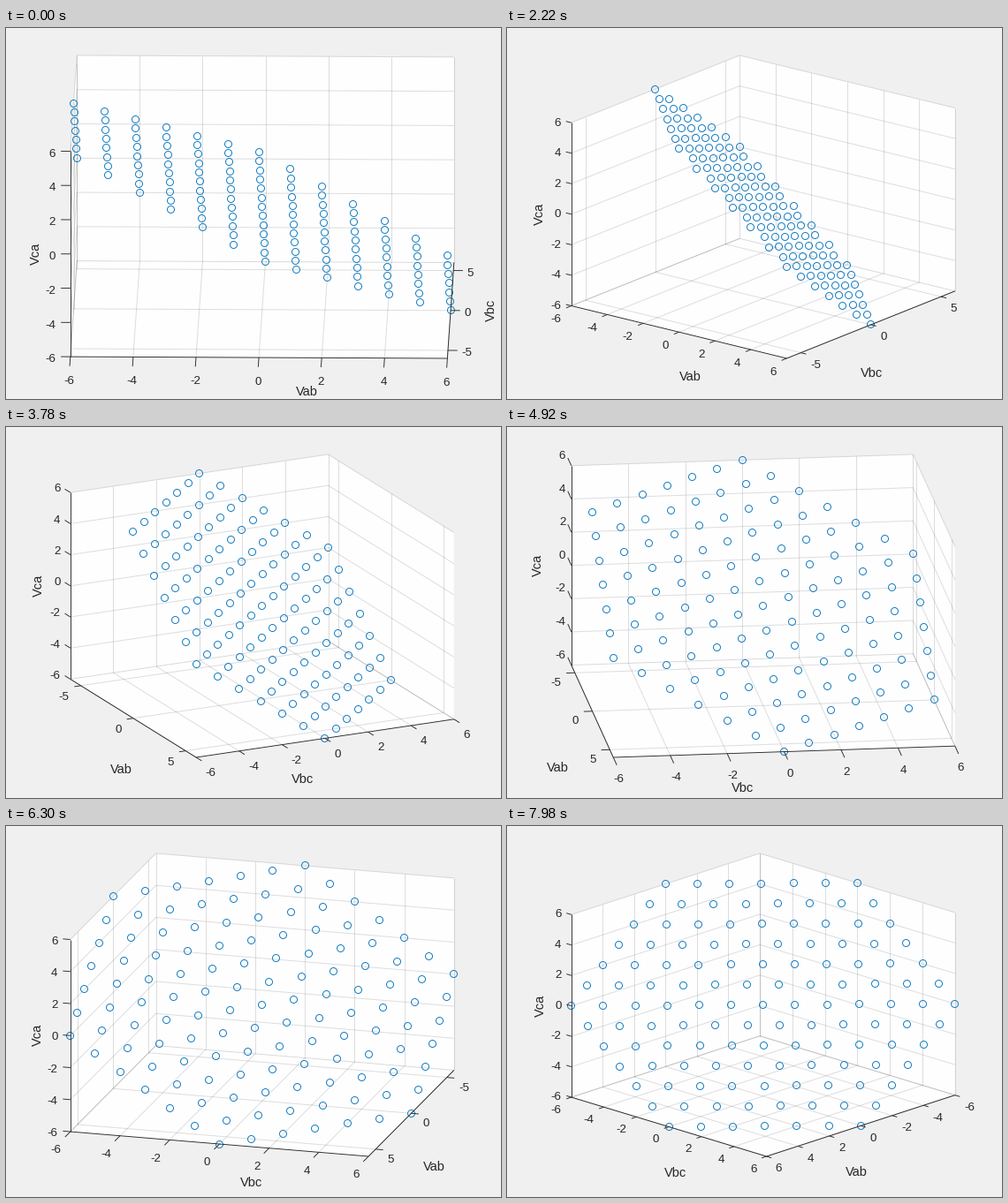
These frames come from a looping animation (560 by 420 pixels, 8000 ms). A matplotlib script:

```python
import numpy as np
import matplotlib.pyplot as plt
from matplotlib.animation import FuncAnimation
from matplotlib.collections import (EllipseCollection, LineCollection,
                                    PolyCollection)

W, H, DPI = 560, 420, 100
PX = 72 / DPI                      # points per pixel
LEFT, TOP, BOX_W, BOX_H = 72.8, 31, 434, 343
LIM = 6
ELEV = np.tan(np.radians(25))
INK = (0.15, 0.15, 0.15)
BLUE = "#0072BD"
TICK_PX, NAME_PX = 13.33, 14.67
NAMES = ("Vab", "Vbc", "Vca")
# sideways shift of an axis name against the lean of its axis in degrees
LEAN = (0, 26, 52, 70, 83, 90)
SHIFT = (55, 25, -1, -20, -39.5, -46)

plt.rcParams["font.family"] = "Liberation Sans"
fig = plt.figure(figsize=(W / DPI, H / DPI), dpi=DPI, facecolor="#f0f0f0")
ax = fig.add_axes([0, 0, 1, 1])
ax.set_xlim(0, W)
ax.set_ylim(H, 0)
ax.axis("off")

# all integer triples inside the cube whose sum is zero
span = range(-LIM, LIM + 1)
POINTS = np.array([(a, b, -a - b) for a in span for b in span
                   if abs(a + b) <= LIM], float)

walls = PolyCollection([], facecolors="#fefefe", edgecolors="none", zorder=1)
grid = LineCollection([], colors=[INK + (0.15,)], linewidths=PX, zorder=2)
dots = EllipseCollection([8], [8], [0], units="xy", offsets=POINTS[:, :2],
                         offset_transform=ax.transData, facecolors="none",
                         edgecolors=BLUE, linewidths=0.9 * PX, zorder=3)
rulers = LineCollection([], colors=[INK], linewidths=0.9 * PX, zorder=4)
for part in (walls, grid, dots, rulers):
    ax.add_collection(part, autolim=False)


def make_text(size):
    return ax.text(0, 0, "", fontsize=size * PX, color=INK, va="baseline",
                   ha="center", rotation_mode="anchor", zorder=5)


tick_texts = [make_text(TICK_PX) for _ in range(21)]
name_texts = [make_text(NAME_PX) for _ in NAMES]


def projector(az):
    """Orthographic view stretched so that the cube fills the plot box."""
    c, s = np.cos(np.radians(az)), np.sin(np.radians(az))
    spread = abs(c) + abs(s)
    kx = BOX_W / (2 * LIM * spread)
    ky = BOX_H / (2 * LIM * (1 + ELEV * spread))

    def project(p):
        x, y, z = np.moveaxis(np.asarray(p, float), -1, 0)
        u = LEFT + BOX_W / 2 + kx * (c * x + s * y)
        v = TOP + BOX_H / 2 - ky * (ELEV * (c * y - s * x) + z)
        return np.stack([u, v], -1)

    return project


def edge(axis, base):
    """The two ends of the cube edge along an axis through a corner."""
    a, b = list(base), list(base)
    a[axis], b[axis] = -LIM, LIM
    return np.array([a, b], float)


def wall(axis, value):
    i, j = [k for k in range(3) if k != axis]
    quad = np.full((4, 3), float(value))
    quad[:, i] = [-LIM, LIM, LIM, -LIM]
    quad[:, j] = [-LIM, -LIM, LIM, LIM]
    return quad


def place_tick(text, value, at, way, length, is_z):
    x, y = at + way * (length + 6)
    if abs(way[0]) < (0.3 if is_z else 0.5):
        align = "center"
    else:
        align = "left" if way[0] > 0 else "right"
    if align == "left":
        x -= 1
    below = not is_z and abs(way[1]) > 0.02
    y += 8.3 if below else 0.6
    text.set(text=str(value), ha=align, position=(x, y + 0.43 * TICK_PX))


def place_name(text, mid, lean, on_left):
    shift = np.interp(lean, LEAN, SHIFT)
    x = mid[0] + (shift if on_left else -shift)
    if lean > 87:
        text.set(rotation=90, position=(x + 0.36 * NAME_PX, mid[1]))
    else:
        y = mid[1] + 37 + 0.3 * lean
        text.set(rotation=0, position=(x, y + 0.41 * NAME_PX))


def draw(i):
    az = 1 + i // 3                # one degree every 60 ms
    project = projector(az)
    x_left = az <= 90              # which floor axis runs on the left
    front_y = -LIM if x_left else LIM
    z_base = (-LIM if x_left else LIM, -LIM, -LIM)

    edges = [edge(0, (0, front_y, -LIM)), edge(1, (LIM, 0, -LIM)),
             edge(2, z_base)]
    lines = [project(e) for e in edges]
    sizes = [np.hypot(*(l[1] - l[0])) for l in lines]
    length = 0.025 * max(sizes)
    steps = [2 if sizes[0] > 213 else 5, 2 if sizes[1] > 213 else 5, 2]
    ticks = [range(-(LIM // s) * s, LIM + 1, s) for s in steps]

    back = (-LIM, -front_y, -LIM)
    walls.set_verts([project(wall(k, back[k])) for k in range(3)])
    mesh = []
    for plane in range(3):
        for fixed in range(3):
            if fixed == plane:
                continue
            run = 3 - plane - fixed
            for t in ticks[fixed]:
                base = [0, 0, 0]
                base[plane], base[fixed] = back[plane], t
                mesh.append(project(edge(run, base)))
    grid.set_segments(mesh)
    dots.set_offsets(np.floor(project(POINTS)) + 0.5)   # whole pixels

    # outward directions of the tick marks
    out = np.zeros((3, 3))
    out[0, 1] = np.sign(front_y)
    out[1, 0] = 1
    out[2, 0 if x_left else 1] = -1

    strokes = list(lines)
    spare = iter(tick_texts)
    origin = project((0, 0, 0))
    for k in range(3):
        way = project(out[k]) - origin
        way = way / np.hypot(*way)
        for t in ticks[k]:
            p = edges[k][0].copy()
            p[k] = t
            at = project(p)
            strokes.append(np.array([at, at + way * length]))
            place_tick(next(spare), t, at, way, length, k == 2)
    rulers.set_segments(strokes)
    for text in spare:
        text.set_text("")

    mids = [l.mean(axis=0) for l in lines]
    place_name(name_texts[0], mids[0], min(az, 180 - az), x_left)
    place_name(name_texts[1], mids[1], abs(90 - az), not x_left)
    name_texts[2].set(rotation=90, position=(
        40.5 - 0.7 * length + 0.36 * NAME_PX, mids[2][1] - 0.8))
    for text, name in zip(name_texts, NAMES):
        text.set_text(name)
    return [walls, grid, dots, rulers, *tick_texts, *name_texts]


anim = FuncAnimation(fig, draw, frames=400, interval=20, repeat=True,
                     repeat_delay=0, blit=False)
plt.show()
```
